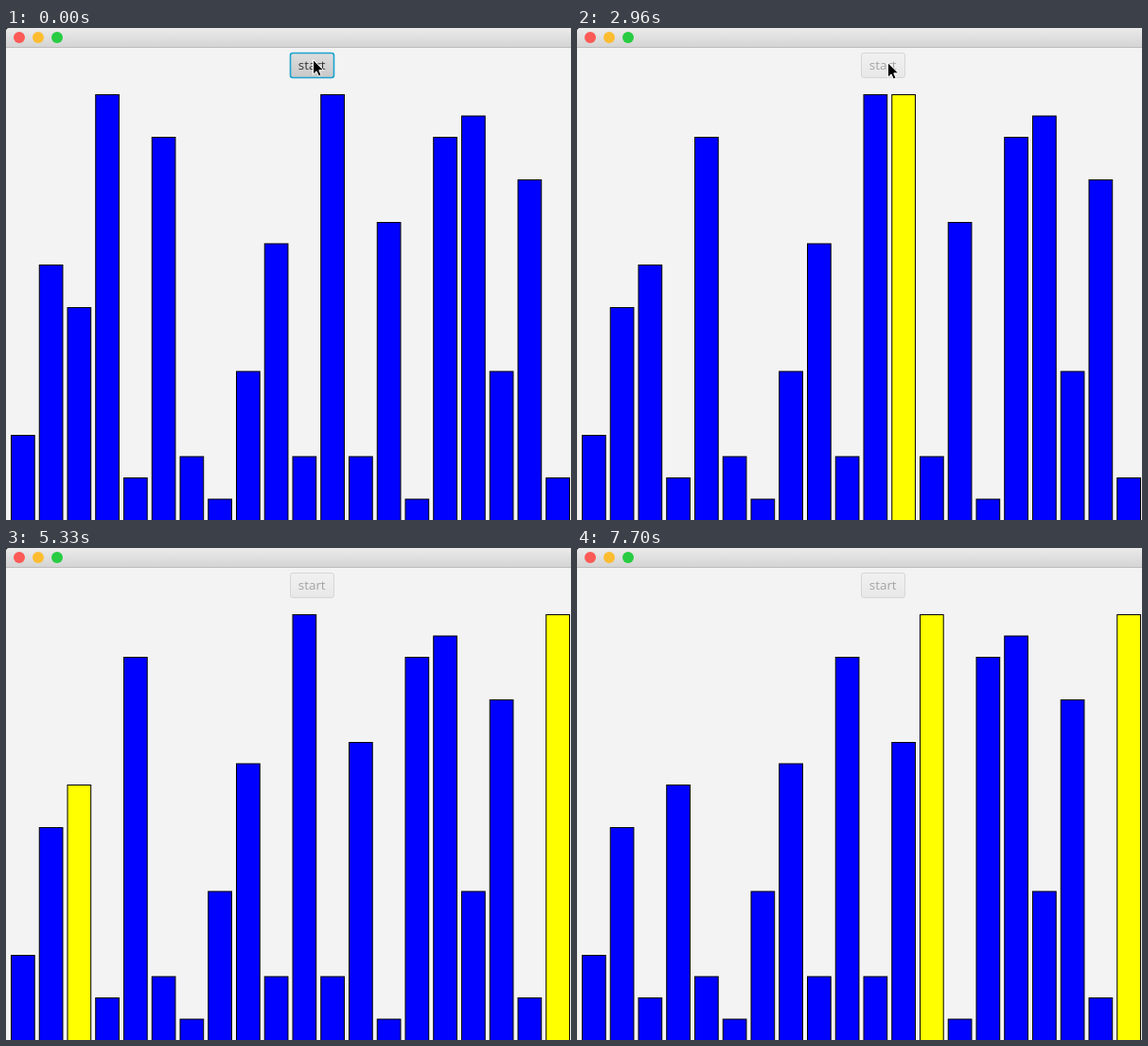
These frames come from a looping animation (597x520 px, 8 s). An HTML page:

```html
<!DOCTYPE html>
<html lang="en">
<head>
<meta charset="utf-8">
<title>Bubble sort</title>
<style>
  html, body { margin: 0; width: 100%; height: 100%; overflow: hidden; background: #f3f3f3; }
  svg { display: block; width: 597px; height: 520px; }
  text { font: 13.4px "Open Sans", "Noto Sans", sans-serif; text-anchor: middle; }
</style>
</head>
<body>
<svg viewBox="0 0 597 520">
  <defs>
    <linearGradient id="title" x2="0" y2="1">
      <stop stop-color="#ebebeb"/><stop offset="1" stop-color="#d4d4d4"/>
    </linearGradient>
    <linearGradient id="pressed" x2="0" y2="1">
      <stop stop-color="#dedede"/><stop offset="1" stop-color="#c8c8c8"/>
    </linearGradient>
    <linearGradient id="faded" x2="0" y2="1">
      <stop stop-color="#f1f1f1"/><stop offset="1" stop-color="#e8e8e8"/>
    </linearGradient>
  </defs>
  <rect width="597" height="520" fill="#f3f3f3"/>
  <rect width="597" height="20" fill="url(#title)"/>
  <rect y="20" width="597" height="1" fill="#bdbdbd"/>
  <path d="M0 0H3Q0 0 0 3Z"/>
  <circle cx="14" cy="10" r="6" fill="#fc5b57"/>
  <circle cx="34" cy="10" r="6" fill="#fdbd31"/>
  <circle cx="54" cy="10" r="6" fill="#28cc42"/>
  <g id="bars" stroke="#000"></g>
  <rect id="button" x="300.5" y="26.5" width="46" height="26" rx="2.5"/>
  <text id="label" x="323.2" y="44.3">start</text>
  <path id="cursor" d="M0 0V15.6L3.6 12.2L5.9 17.4L8.6 16.2L6.3 11.2H11.2Z"
        fill="#000" stroke="#fff" stroke-linejoin="round"/>
</svg>
<script>
const LOOP = 8000;
const FRAME = 148.1, FRAME_LEAD = 14;           // the picture refreshes in coarse ticks
const START = 52, COMPARE = 216, SWAP_LAG = 40; // pace of the sort, in ms
const POINTER_LEAVES = 2850, POINTER_TRIP = 850;
const SPACING = 29.75, UNIT = 22.5;
const values = [4, 12, 10, 20, 2, 18, 3, 1, 7, 13, 3, 20, 3, 14, 1, 18, 19, 7, 16, 2];

const byId = id => document.getElementById(id);

function setAttrs(node, attrs) {
  for (const name in attrs) node.setAttribute(name, attrs[name]);
}

const bars = values.map((_, i) => {
  const bar = document.createElementNS("http://www.w3.org/2000/svg", "rect");
  setAttrs(bar, { x: 5.5 + SPACING * i, width: 24.7 });
  return byId("bars").appendChild(bar);
});

// Bubble sort up to a moment: a swap shows first, its highlight follows after a short lag.
function sortState(time) {
  const heights = values.slice();
  let clock = START;
  for (let end = values.length - 1; end > 0; end--) {
    for (let j = 0; j < end; j++) {
      const state = { heights, head: time < clock ? j - 1 : j, sortedFrom: end + 1 };
      clock += COMPARE;
      if (time < clock) return state;
      if (heights[j] > heights[j + 1]) {
        [heights[j], heights[j + 1]] = [heights[j + 1], heights[j]];
        if (j + 1 < end) clock += SWAP_LAG;
      }
    }
  }
  return { heights, head: -1, sortedFrom: 0 };
}

function pointerAt(time) {
  const u = Math.max(0, time - POINTER_LEAVES) / POINTER_TRIP;
  return [324.5 + 30 * u, 33.5 + 24 * u - 90 * u ** 4];
}

function render(loopTime) {
  const time = Math.floor((loopTime + FRAME_LEAD) / FRAME) * FRAME;
  const { heights, head, sortedFrom } = sortState(time);
  bars.forEach((bar, i) => setAttrs(bar, {
    y: 520.5 - UNIT * heights[i],
    height: UNIT * heights[i] + 5,
    fill: i === head || i >= sortedFrom ? "#ff0" : "#00f"
  }));

  const idle = time < START;
  setAttrs(byId("button"), {
    fill: idle ? "url(#pressed)" : "url(#faded)",
    stroke: idle ? "#1ba3cf" : "#d6d6d6",
    "stroke-width": idle ? 1.6 : 1
  });
  setAttrs(byId("label"), { fill: idle ? "#333" : "#a3a3a3" });
  setAttrs(byId("cursor"), { transform: `translate(${pointerAt(time)})` });
}

const begin = performance.now();
function tick() {
  render((performance.now() - begin) % LOOP);
  requestAnimationFrame(tick);
}
render(0);
requestAnimationFrame(tick);
</script>
</body>
</html>
```
